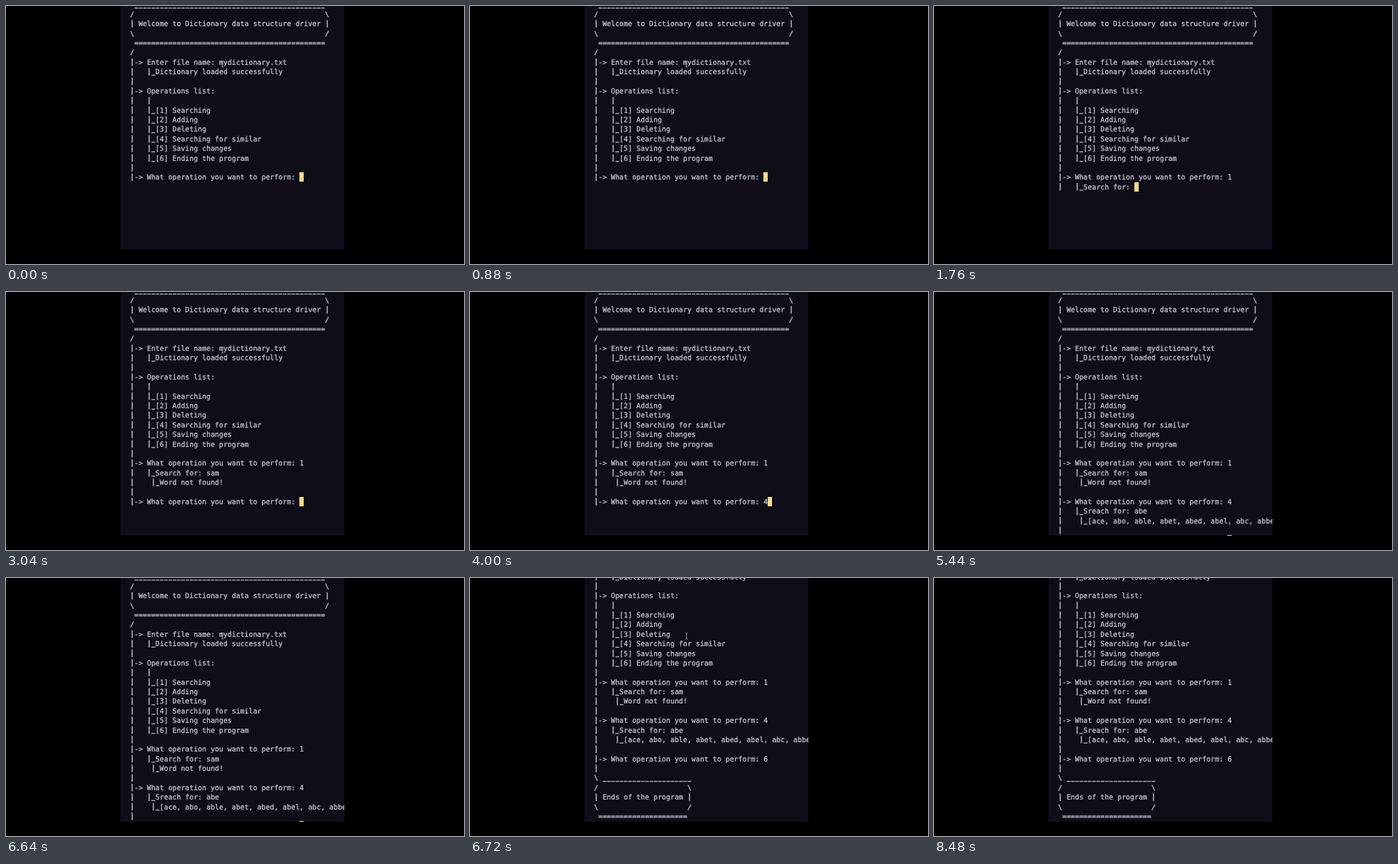
Write an HTML page with a canvas that moves like this. It is 640 px wide and 360 px high and loops after 8560 ms.

```html
<!DOCTYPE html>
<html lang="en">
<head>
<meta charset="utf-8">
<title>Dictionary driver</title>
<style>
html, body { margin: 0; width: 100%; height: 100%; overflow: hidden; background: #000; }
canvas { display: block; width: 640px; height: 360px; }
</style>
</head>
<body>
<canvas id="stage" width="640" height="360"></canvas>
<script>
const ctx = document.getElementById('stage').getContext('2d');

const LOOP = 8560;
const SCROLL_AT = 6720;
const POINTER_HIDES = 7200;
const SCROLL_ROWS = 7;
const CELL = { w: 5.925, h: 13.375 };
const LEFT = 173.3;
const FIRST_ROW_Y = -1.3;
const BASELINE = 2.9;
const WINDOW = { x: 160, y: 0, w: 313, h: 340 };
const COLORS = { panel: '#0e0d18', text: '#c1c3d1', cursor: '#fddc8b' };

const PROMPT = '|-> What operation you want to perform: ';

const box = (title, opener) => {
  const inner = title.length + 2;
  return [
    opener + ' ' + '_'.repeat(inner),
    '/' + ' '.repeat(inner) + '\\',
    '| ' + title + ' |',
    '\\' + ' '.repeat(inner) + '/',
    ' ' + '='.repeat(inner)
  ].join('\n');
};

const operations = ['Searching', 'Adding', 'Deleting', 'Searching for similar',
  'Saving changes', 'Ending the program'];

const intro = [
  box('Welcome to Dictionary data structure driver', ''),
  '/',
  '|-> Enter file name: mydictionary.txt',
  '|   |_Dictionary loaded successfully',
  '|',
  '|-> Operations list:',
  '|   |',
  ...operations.map((name, i) => `|   |_[${i + 1}] ${name}`),
  '|',
  PROMPT
].join('\n');

// Each entry appends its text to the terminal at the given time.
const session = [
  [0, intro],
  [1280, '1'],
  [1600, '\n|   |_Search for: '],
  [1920, 's'],
  [2080, 'a'],
  [2160, 'm'],
  [2480, '\n|    |_Word not found!\n|\n' + PROMPT],
  [3760, '4'],
  [4080, '\n|   |_Sreach for: '],
  [4880, 'a'],
  [5040, 'b'],
  [5120, 'e'],
  [5280, '\n|    |_[ace, abo, able, abet, abed, abel, abc, abbe\n|\n' + PROMPT],
  [SCROLL_AT, '6\n|\n' + box('Ends of the program', '\\') + '\n\n']
];

// Bars and underscores are heavier and sit higher than the font's own.
function drawChar(char, x, y) {
  if (char === '|') {
    ctx.fillRect(x + 2.3, y - 8.6, 1.4, 10.4);
  } else if (char === '_') {
    ctx.fillRect(x + 0.3, y + 0.7, CELL.w - 0.6, 1.2);
  } else if (char !== ' ') {
    ctx.fillText(char, x, y);
    ctx.strokeText(char, x, y);
  }
}

function drawPointer(x, y) {
  ctx.strokeStyle = '#aaa9b3';
  ctx.lineWidth = 0.8;
  ctx.beginPath();
  ctx.moveTo(x, y - 4);
  ctx.lineTo(x, y + 4);
  for (const end of [y - 4, y + 4]) {
    ctx.moveTo(x - 1.5, end);
    ctx.lineTo(x + 1.5, end);
  }
  ctx.stroke();
}

function draw(time) {
  const lines = session.filter(([at]) => time >= at)
    .map(([, text]) => text).join('').split('\n');
  const scroll = time >= SCROLL_AT ? SCROLL_ROWS : 0;
  const rowY = row => FIRST_ROW_Y + (row - scroll) * CELL.h;

  ctx.fillStyle = '#000';
  ctx.fillRect(0, 0, 640, 360);
  ctx.save();
  ctx.beginPath();
  ctx.rect(WINDOW.x, WINDOW.y, WINDOW.w, WINDOW.h);
  ctx.clip();
  ctx.fillStyle = COLORS.panel;
  ctx.fillRect(WINDOW.x, WINDOW.y, WINDOW.w, WINDOW.h);

  ctx.font = '9.84px "DejaVu Sans Mono", monospace';
  ctx.textRendering = 'geometricPrecision';
  ctx.textBaseline = 'alphabetic';
  ctx.fillStyle = ctx.strokeStyle = COLORS.text;
  ctx.lineWidth = 0.3;
  ctx.lineJoin = 'round';
  lines.forEach((line, row) => {
    [...line].forEach((char, col) => {
      drawChar(char, LEFT + col * CELL.w, rowY(row) + BASELINE);
    });
  });

  const last = lines.length - 1;
  const cursorX = LEFT + lines[last].length * CELL.w;
  const cursorY = rowY(last) - CELL.h / 2;
  ctx.fillStyle = COLORS.cursor;
  ctx.fillRect(Math.round(cursorX), Math.floor(cursorY), 6, 13);

  if (time < POINTER_HIDES) drawPointer(302.5, 81);
  ctx.restore();
}

function tick() {
  draw(performance.now() % LOOP);
  requestAnimationFrame(tick);
}
tick();
</script>
</body>
</html>
```
